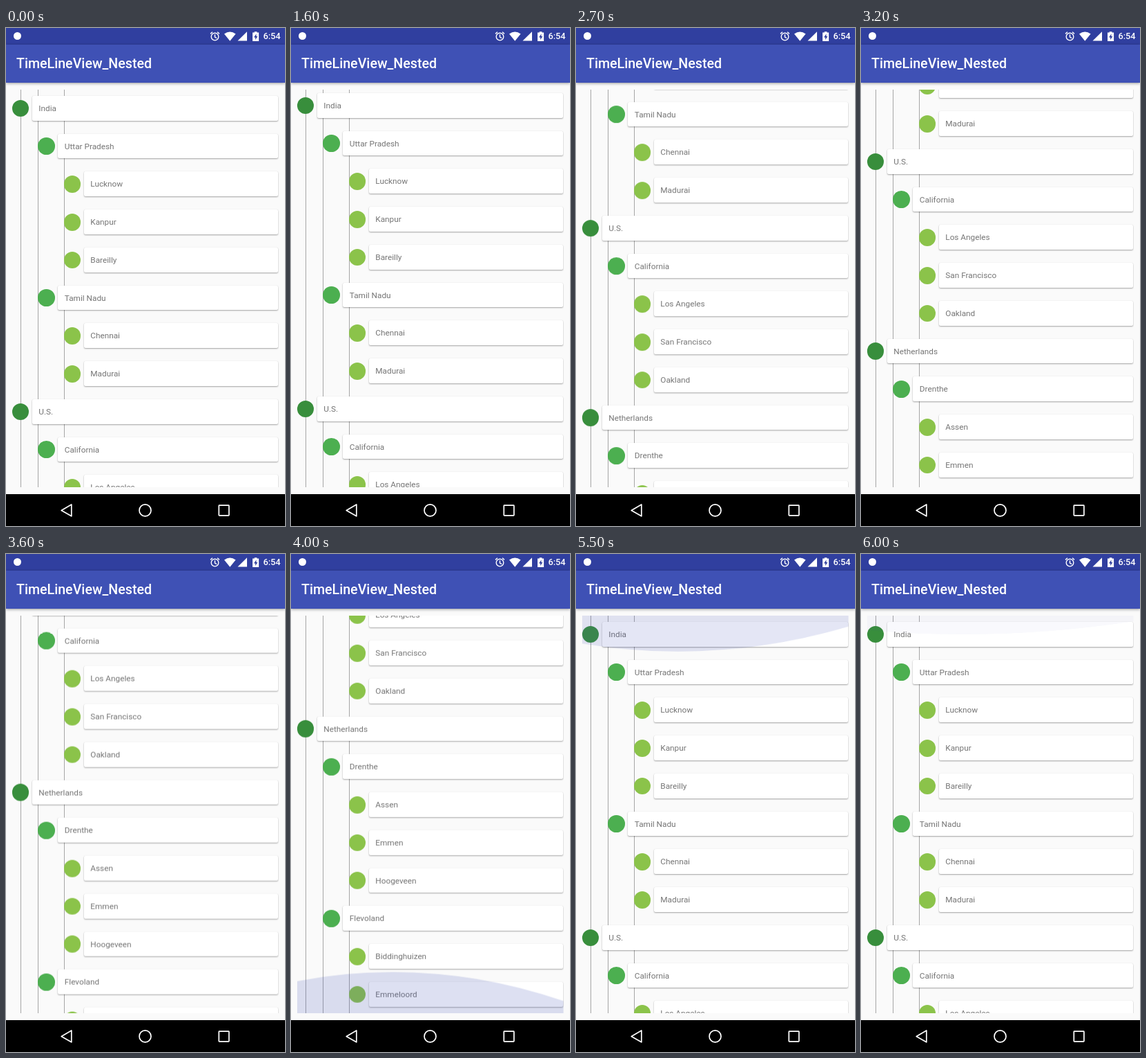
These frames come from a looping animation (404 px wide and 719 px high, 6.1 s). An HTML page:

```html
<!DOCTYPE html>
<html lang="en">
<head>
<meta charset="utf-8">
<title>TimeLineView_Nested</title>
<style>
  html, body { margin: 0; width: 100%; height: 100%; overflow: hidden; background: #fafafa; }
  body { position: relative; font-family: Roboto, "Noto Sans", sans-serif; }
  .status, .bar, .nav, .view, .icons { position: absolute; left: 0; }
  .status { top: 0; width: 404px; height: 24px; background: #303f9f; }
  .bar {
    top: 24px; width: 404px; height: 55px; background: #3f51b5;
    box-shadow: 0 1px 4px rgba(0, 0, 0, .4);
    color: #fff; font-size: 19.64px; font-weight: 500; line-height: 56px;
    text-indent: 15px; white-space: nowrap;
  }
  .nav { top: 673px; width: 404px; height: 46px; background: #000; }
  .icons { top: 0; }
  .clock { font-size: 12.8px; font-weight: 500; fill: #fff; }

  .view { left: 9px; top: 88.6px; width: 385.5px; height: 574.6px; overflow: hidden; }
  .line { position: absolute; top: 0; width: 1px; height: 100%; background: #a6a6a6; }
  .list { position: absolute; inset: 0; animation: scroll 6.1s infinite; }
  .row { position: relative; height: 54.75px; margin-left: calc(var(--depth) * 37.5px); }
  .dot { position: absolute; left: -.3px; top: 15.1px; width: 24.6px; height: 24.6px; border-radius: 50%; }
  .card {
    position: absolute; left: 28.8px; right: .5px; top: 9.4px; height: 35.6px;
    box-sizing: border-box; padding-left: 9.5px; border-radius: 2px; background: #fff;
    box-shadow: 0 1px 2px rgba(0, 0, 0, .34), 0 0 1px rgba(0, 0, 0, .12);
    color: #757575; font-size: 11.79px; line-height: 36px; white-space: nowrap;
  }

  .glow { position: absolute; left: 0; top: 0; }
  .glow path { fill: #3f51b5; transform-origin: 0 0; }
  .low { animation: low 6.1s infinite; }
  .high { animation: high 6.1s infinite; }

  /* the screen refreshes every 100 ms, so each stretch moves in steps */
  @keyframes scroll {
    0%     { transform: translateY(0); animation-timing-function: steps(1); }
    26.22% { transform: translateY(-4px); animation-timing-function: steps(6); }
    36.06% { transform: translateY(-168.8px); animation-timing-function: steps(10); }
    52.45% { transform: translateY(-361px); animation-timing-function: steps(7); }
    63.93% { transform: translateY(-575.2px); animation-timing-function: steps(1); }
    85.24% { transform: translateY(-385px); animation-timing-function: steps(2); }
    88.52%, 100% { transform: translateY(0); }
  }
  @keyframes low {
    0%     { transform: scaleY(0); opacity: 0; animation-timing-function: steps(1); }
    63.93% { transform: scaleY(.6); opacity: .1; animation-timing-function: steps(1); }
    65.57% { transform: scaleY(1); opacity: .18; animation-timing-function: steps(6); }
    75.4%, 100% { transform: scaleY(0); opacity: 0; }
  }
  @keyframes high {
    0%     { transform: scaleY(0); opacity: 0; animation-timing-function: steps(1); }
    88.52% { transform: scaleY(1); opacity: .18; animation-timing-function: steps(4); }
    95.08%, 100% { transform: scaleY(.45); opacity: .035; }
  }
</style>
</head>
<body>
<div class="view">
  <div class="line" style="left:12px"></div>
  <div class="line" style="left:37.4px"></div>
  <div class="line" style="left:75px"></div>
  <div class="list" id="list"></div>
  <svg class="glow" width="385.5" height="574.6">
    <path class="high" d="M0 0V46.7Q192.75 83.6 385.5 18.3V0Z"/>
    <g transform="translate(0 574.6) scale(1 -1)">
      <path class="low" d="M0 0V46.7Q192.75 83.6 385.5 18.3V0Z"/>
    </g>
  </svg>
</div>
<div class="status"></div>
<div class="bar">TimeLineView_Nested</div>
<div class="nav"></div>
<svg class="icons" width="404" height="719" fill="#fff">
  <circle cx="16.5" cy="11.5" r="5.5"/>
  <g fill="none" stroke="#fff" stroke-width="1.4">
    <circle cx="302.5" cy="12.6" r="5.3"/>
    <path d="M302.5 9.3V13l2.6 1.6M296 8.4l3-2.6M309 8.4l-3-2.6"/>
  </g>
  <path d="M316 8.6Q324.3 2.4 332.6 8.6L324.3 18.8Z"/>
  <path d="M335.5 18.6H349V5.2Z"/>
  <path d="M357 6.6h2.7V5.2h3.7v1.4h2.7V19h-9.1Z"/>
  <path d="M362.4 8.6l-3.4 5h2.1V17l3.2-5h-1.9Z" fill="#303f9f"/>
  <text class="clock" x="372.4" y="16.4">6:54</text>
  <g fill="none" stroke="#fff" stroke-width="1.7" stroke-linejoin="round">
    <path d="M80.2 696.4L94.8 688V704.8Z"/>
    <circle cx="201.5" cy="696.4" r="8.5"/>
    <rect x="308.3" y="689.2" width="14.6" height="14.6" rx=".6"/>
  </g>
</svg>
<script>
  const colors = ['#388e3c', '#4caf50', '#8bc34a'];
  const places = {
    'India': {
      'Uttar Pradesh': ['Lucknow', 'Kanpur', 'Bareilly'],
      'Tamil Nadu': ['Chennai', 'Madurai']
    },
    'U.S.': { 'California': ['Los Angeles', 'San Francisco', 'Oakland'] },
    'Netherlands': {
      'Drenthe': ['Assen', 'Emmen', 'Hoogeveen'],
      'Flevoland': ['Biddinghuizen', 'Emmeloord']
    }
  };
  const list = document.getElementById('list');

  function addRow(name, depth) {
    list.insertAdjacentHTML('beforeend',
      `<div class="row" style="--depth:${depth}">
        <div class="dot" style="background:${colors[depth]}"></div>
        <div class="card">${name}</div>
      </div>`);
  }

  for (const [country, states] of Object.entries(places)) {
    addRow(country, 0);
    for (const [state, cities] of Object.entries(states)) {
      addRow(state, 1);
      cities.forEach(city => addRow(city, 2));
    }
  }
</script>
</body>
</html>
```
